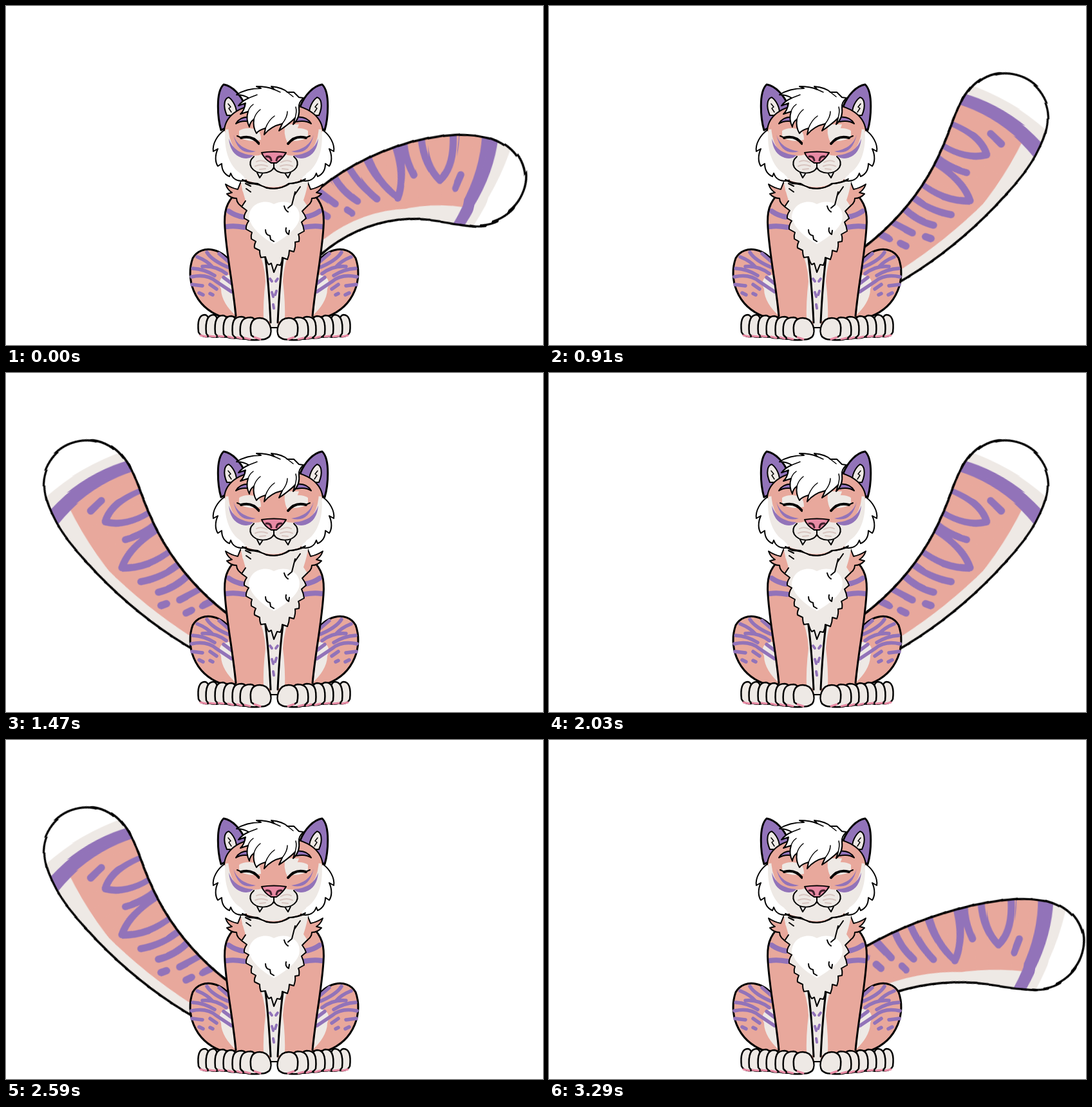
An HTML page without scripts that plays this animation: 834 px wide and 527 px high, repeating every 3360 ms.

```html
<!DOCTYPE html>
<html lang="en">
<head>
<meta charset="utf-8">
<title>Tail wag</title>
<style>
html, body { margin: 0; width: 100%; height: 100%; overflow: hidden; background: #fff; }
svg { display: block; width: 834px; height: 527px; }
path, ellipse { fill: none; stroke-linecap: round; stroke-linejoin: round; }
.coat { fill: #e8a89c; }
.pale { fill: #eee9e5; }
.white { fill: #fff; }
.violet { fill: #9273b9; }
.pink { fill: #e88aa4; }
.band { stroke: #9273b9; stroke-width: 6; }
.ink { stroke: #000; stroke-width: 2; }
.bold { stroke-width: 3; }
.cut { clip-path: url(#slice); }

/* The tail is a chain of slices: one swing of the root, one shared bend. */
.side { animation: side 1120ms step-end infinite; }
.root { animation: swing 560ms step-end infinite; }
.j { animation: bend 560ms step-end infinite; }
@keyframes side {
  0%, 75%, 100% { transform: none; }
  25% { transform: translate(834px, 0) scale(-1, 1); }
}
@keyframes swing {
  0%, 100% { transform: translate(417px, 420px) rotate(-59deg); }
  12.5% { transform: translate(417px, 423px) rotate(-80deg); }
  25% { transform: translate(417px, 428px) rotate(-101deg); }
  37.5% { transform: translate(417px, 432px) rotate(-122deg); }
  50% { transform: translate(438px, 438px) rotate(-40deg); }
  62.5% { transform: translate(449px, 440px) rotate(-27deg); }
  75% { transform: translate(432px, 430px) rotate(-28deg); }
  87.5% { transform: translate(410px, 421px) rotate(-39deg); }
}
@keyframes bend {
  0%, 100% { transform: translate(20px, 0) rotate(3.8deg); }
  12.5% { transform: translate(20px, 0) rotate(4.2deg); }
  25% { transform: translate(20px, 0) rotate(4.1deg); }
  37.5% { transform: translate(20px, 0) rotate(3.7deg); }
  50% { transform: translate(20px, 0) rotate(-3.1deg); }
  62.5% { transform: translate(20px, 0) rotate(-2.2deg); }
  75% { transform: translate(20px, 0) rotate(0deg); }
  87.5% { transform: translate(20px, 0) rotate(2.5deg); }
}
</style>
</head>
<body>
<svg viewBox="0 0 834 527">
<defs>
  <clipPath id="slice"><rect x="-3" y="-95" width="26" height="190"/></clipPath>
  <path id="shape" d="M-10-32C100-37 200-46 268-56S350-68 380-66C425-60 446-30 446 2S422 69 380 73S300 67 268 62C200 51 100 39-10 32Z"/>
  <clipPath id="inside"><use href="#shape"/></clipPath>
  <g id="tail">
    <g clip-path="url(#inside)">
      <path class="coat" d="M-10-80H460V80H-10Z"/>
      <path class="pale" d="M-10 22Q110 20 250 43L362 46V90H-10Z"/>
      <path class="pale" d="M376-80Q380 0 352 80H460V-80Z"/>
      <path class="white" d="M408-80Q410 0 380 80H460V-80Z"/>
      <path class="band" style="stroke-width:21" d="M378-75Q388 0 350 80"/>
      <path class="band" style="stroke-width:11" d="M291-66Q290-18 314 6Q337-16 332-70M268-62Q264-36 274-6M215-55Q216-8 242 24Q262-6 257-58M188-50Q190-16 208 15M164-46Q164-18 178 6M134-40L146-8M346-4L339 18M157 10L161 18M121-8L125 1M106-36L112-24"/>
    </g>
    <use href="#shape" class="ink" style="stroke-width:3.4"/>
  </g>

  <g id="bodyHalf">
    <path class="coat ink bold" d="M352 404C340 378 304 368 290 392C279 422 290 466 334 483L360 484Z"/>
    <path class="pale" d="M350 418C335 418 328 426 334 440C334 456 345 470 355 480Z"/>
    <path class="band" d="M312 383Q320 396 347 407M331 385L345 397M297 390Q312 396 320 405M305 405Q325 403 342 416M290 408Q308 409 324 419M288 421Q312 416 326 428L350 444M289 433L305 435M317 433L327 440M338 422L350 431M300 446L306 449M317 447L321 449" style="stroke-width:5.5"/>
    <path class="coat" d="M358 288C342 303 338 320 340 345C343 390 352 430 357 486L411 498C410 450 406 420 402 380L416 290Z"/>
    <path class="pale" d="M388 370Q402 400 403 428Q399 460 400 490H411C410 450 408 420 402 370Z"/>
    <path class="band" style="stroke-width:8" d="M346 319Q356 326 368 328M343 343Q354 341 370 344"/>
    <path class="ink bold" d="M358 290C342 305 338 320 340 345C343 390 352 430 357 482M402 385C407 420 409 450 411 492"/>
    <g class="ink" style="stroke-width:2.5">
      <path class="pale" d="M299 507C297 490 300 480 309 480Q318 481 317 513Q304 517 299 507Z"/>
      <path class="pale" d="M311 509C309 488 314 480 323 480Q331 482 331 514Q315 517 311 509Z"/>
      <path class="pale" d="M325 509C323 488 328 481 337 481Q348 482 346 514Q329 517 325 509Z"/>
      <path class="pale" d="M338 510C336 490 341 482 350 482Q362 483 361 516Q342 518 338 510Z"/>
      <path class="pale" d="M352 511C350 490 354 483 366 483Q380 484 379 517Q357 520 352 511Z"/>
      <path class="pale" d="M364 511C362 490 368 484 380 484Q393 485 393 519Q370 521 364 511Z"/>
      <path class="pale" d="M381 512C377 493 383 485 394 485C410 485 415 505 409 514Q397 524 381 512Z"/>
    </g>
    <path d="M302 512L311 514M316 513L325 514M330 513L338 514M345 514L353 516M359 515L366 517M371 516L379 518M386 515L395 518" stroke="#e88aa4" stroke-width="3"/>
    <path class="coat ink" d="M366 270L360 285Q350 283 341 277Q344 286 351 290L343 292Q349 299 358 299Q358 308 370 314"/>
  </g>

  <g id="earHalf">
    <path class="violet ink bold" d="M334 193C329 176 325 134 338 122C351 124 365 138 372 156L352 184Z"/>
    <path class="pale ink" d="M343 170C336 154 340 143 346 142C353 147 359 158 358 170Z"/>
    <path class="ink" style="stroke-width:1.5" d="M345 152L349 157L346 159L350 165"/>
  </g>

  <g id="cheekHalf">
    <path class="white ink" d="M339 193C329 200 320 214 322 226L329 222C324 233 325 243 329 249L335 245C335 256 340 262 347 265L349 260C352 269 360 274 373 271"/>
    <path class="pale" d="M341 192C338 212 342 246 364 260L376 272L400 278V220L365 190Z"/>
    <path class="coat" d="M345 183Q350 168 372 164L398 186L394 232Q366 236 354 220Q345 207 345 183Z"/>
    <path class="pale" d="M362 194Q374 186 395 194L396 208Q378 213 362 204Z"/>
    <path class="violet" d="M353 200Q360 222 388 226Q361 234 353 200ZM346 206Q354 230 384 232Q379 239 366 236Q348 230 346 206Z"/>
    <path class="violet ink" d="M357 183Q364 170 383 173L380 180Q366 177 357 183Z"/>
    <path class="ink" style="stroke-width:4" d="M365 205Q382 200 393 214"/>
    <path class="ink" d="M366 205L359 202"/>
  </g>

  <g id="muzzleHalf">
    <path class="pale" d="M416 236L397 232Q378 236 379 247Q384 261 402 260Q412 258 416 252Z"/>
    <path class="white ink" d="M390 259L394 267L398 261"/>
    <path class="ink" d="M385 234Q376 242 381 251C389 263 411 262 416 251M416 243V252"/>
    <path d="M389 242Q396 238 405 243M387 249Q396 245 406 249M394 254L403 253" stroke="#d8c5c0" stroke-width="2"/>
  </g>
</defs>

<g class="side"><g class="root">
<g class="cut"><use href="#tail"/></g>
<g class="j"><g class="cut"><use href="#tail" x="-20"/></g>
<g class="j"><g class="cut"><use href="#tail" x="-40"/></g>
<g class="j"><g class="cut"><use href="#tail" x="-60"/></g>
<g class="j"><g class="cut"><use href="#tail" x="-80"/></g>
<g class="j"><g class="cut"><use href="#tail" x="-100"/></g>
<g class="j"><g class="cut"><use href="#tail" x="-120"/></g>
<g class="j"><g class="cut"><use href="#tail" x="-140"/></g>
<g class="j"><g class="cut"><use href="#tail" x="-160"/></g>
<g class="j"><g class="cut"><use href="#tail" x="-180"/></g>
<g class="j"><g class="cut"><use href="#tail" x="-200"/></g>
<g class="j"><g class="cut"><use href="#tail" x="-220"/></g>
<g class="j"><g class="cut"><use href="#tail" x="-240"/></g>
<g class="j"><g class="cut"><use href="#tail" x="-260"/></g>
<g class="j"><g class="cut"><use href="#tail" x="-280"/></g>
<g class="j"><g class="cut"><use href="#tail" x="-300"/></g>
<g class="j"><g class="cut"><use href="#tail" x="-320"/></g>
<g class="j"><g class="cut"><use href="#tail" x="-340"/></g>
<g class="j"><g class="cut"><use href="#tail" x="-360"/></g>
<g class="j"><g class="cut"><use href="#tail" x="-380"/></g>
<g class="j"><g class="cut"><use href="#tail" x="-400"/></g>
<g class="j"><g class="cut"><use href="#tail" x="-420"/></g>
<g class="j"><g class="cut"><use href="#tail" x="-440"/></g>
</g></g></g></g></g></g></g></g></g></g></g></g></g></g></g></g></g></g></g></g></g></g>
</g></g>

<!-- body -->
<path class="pale" d="M395 380H437L422 502H410Z"/>
<path class="band" style="stroke-width:4" d="M410 424L413 428M422 424L419 428M413 445L415 452M420 443L418 449M415 464L416 470"/>
<path class="ink" d="M411 500H422"/>
<use href="#bodyHalf"/>
<use href="#bodyHalf" transform="matrix(-1 0 0 1 833 0)"/>
<path class="pale" d="M364 268C366 285 370 294 372 303L366 312L374 318L370 330L377 334L373 347L382 352L381 362L388 366L386 376L394 380L396 391L403 390L408 402L412 400L416 414L421 402L426 403L429 391L437 394L440 380L447 382L449 367L455 366L454 355L463 350L459 336L466 330L460 319L468 311L462 302Q468 284 470 268Z"/>
<path class="white" d="M377 330C377 308 400 299 416 308C436 298 461 310 455 334Q448 352 416 370Q384 352 377 330Z"/>
<path class="ink" d="M372 303L366 312L374 318Q369 325 370 330L377 334Q372 341 373 347L382 352Q380 357 381 362L388 366Q385 372 386 376L394 380Q394 387 396 391L403 390Q405 398 408 402L412 400L416 414L421 402L426 403Q429 397 429 391L437 394Q440 387 440 380L447 382Q450 374 449 367L455 366Q456 359 454 355L463 350Q462 342 459 336L466 330Q464 324 460 319L468 311"/>
<path class="ink" d="M380 280L372 276M373 284L380 289M457 281L448 294M449 289L444 309L438 314M432 311Q434 318 438 320M403 348Q403 356 410 357L411 363L416 366M435 345Q433 352 439 355L440 349"/>

<!-- head -->
<use href="#earHalf"/>
<use href="#earHalf" transform="matrix(-1 0 0 1 829 0)"/>
<path class="coat ink" d="M339 193C341 170 362 152 416 150C468 152 489 170 492 193C500 225 490 255 467 269Q455 275 441 276Q427 286 405 283Q392 276 378 276L365 269C342 255 332 225 339 193Z"/>
<use href="#cheekHalf"/>
<use href="#cheekHalf" transform="matrix(-1 0 0 1 831 0)"/>
<path class="pale" d="M377 237H454L466 262Q450 274 440 275Q418 287 392 277L370 268Z"/>
<path class="pale" d="M434 184L455 184L450 198L437 212Q430 198 434 184Z"/>
<path class="coat" d="M388 182L434 184Q427 198 436 214L437 231L416 236L394 231Q390 222 397 205Z"/>
<path class="ink" d="M367 270Q380 276 391 276Q403 284 417 284Q430 283 439 276Q452 276 465 269"/>
<use href="#muzzleHalf"/>
<use href="#muzzleHalf" transform="matrix(-1 0 0 1 832 0)"/>
<path class="pink ink" d="M397 228Q416 225 435 228Q430 237 420 244H412Q401 238 397 228Z"/>
<path d="M404 234Q411 233 412 240M428 234Q421 233 420 240" stroke="#40202c" stroke-width="3"/>
<path class="white ink" d="M358 138Q373 128 396 128L389 125Q406 125 417 130L412 125Q430 127 437 134L447 134L455 142L462 143Q454 150 455 158Q457 174 446 184L449 174Q439 184 424 194L429 183Q411 187 401 200L403 190Q392 193 389 198Q383 188 385 176Q379 180 378 188Q372 176 376 164L364 168Q370 163 372 151L361 155Q366 148 377 143Q369 138 358 138Z"/>
<path class="ink" style="stroke-width:1.5" d="M385 176Q388 166 395 161M403 190Q408 177 417 171M429 183Q437 173 437 164M449 174Q452 164 450 157M376 164Q378 157 384 153M377 143L390 138M437 134L446 141M417 130L426 134"/>
</svg>
</body>
</html>
```
